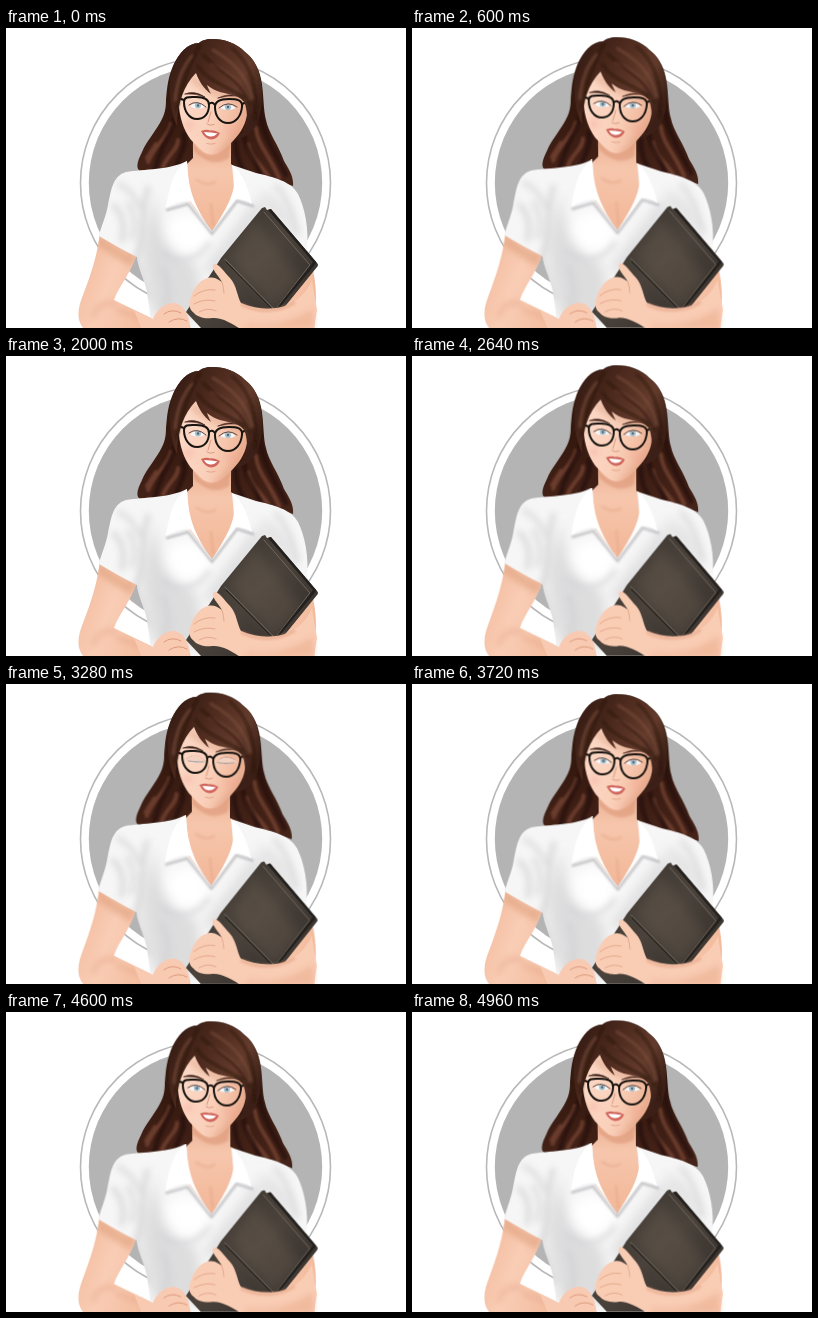
An HTML page for the animation above (5 s loop, 400 by 300 pixels).

```html
<!DOCTYPE html>
<html lang="en">
<head>
<meta charset="utf-8">
<title>Woman with folder</title>
<style>
  html, body { margin: 0; width: 100%; height: 100%; overflow: hidden; background: #fff; }
  svg { display: block; width: 400px; height: 300px; }
  .body, .head, .lids { animation: 5s ease-in-out infinite; }
  .body { transform-origin: 200px 300px; animation-name: breathe; }
  .head { transform-origin: 206px 125px; animation-name: nod; }
  .lids { transform-origin: 206px 71px; transform: scaleY(0); animation-name: blink; }
  @keyframes breathe {
    0%, 41%, 82% { transform: none; }
    20.5%, 61.5%, 100% { transform: skewX(.4deg) scaleY(1.014); }
  }
  @keyframes nod {
    0%, 41%, 82% { transform: none; }
    20.5%, 61.5%, 100% { transform: translate(-1.6px, -2.4px) rotate(-.4deg); }
  }
  @keyframes blink {
    0%, 63.2% { transform: scaleY(0); }
    65%, 66.2% { transform: none; }
    68%, 100% { transform: scaleY(0); }
  }
</style>
</head>
<body>
<svg viewBox="0 0 400 300" fill="none" stroke-linecap="round" stroke-linejoin="round">
  <defs>
    <filter id="soft1" x="-50%" y="-50%" width="200%" height="200%"><feGaussianBlur stdDeviation="1.2"/></filter>
    <filter id="soft2" x="-50%" y="-50%" width="200%" height="200%"><feGaussianBlur stdDeviation="3"/></filter>
    <filter id="soft3" x="-50%" y="-50%" width="200%" height="200%"><feGaussianBlur stdDeviation="6"/></filter>
    <linearGradient id="hairTone" x1="0" y1="0" x2="0" y2="1">
      <stop offset="0" stop-color="#32190f"/><stop offset=".5" stop-color="#35190f"/><stop offset="1" stop-color="#47241a"/>
    </linearGradient>
    <linearGradient id="bangTone" x1="0" y1="0" x2="1" y2=".6">
      <stop offset="0" stop-color="#2f1811"/><stop offset=".4" stop-color="#4a281c"/><stop offset=".75" stop-color="#633b2c"/><stop offset="1" stop-color="#3c2017"/>
    </linearGradient>
    <linearGradient id="faceTone" x1="0" y1="0" x2="1" y2=".3">
      <stop offset="0" stop-color="#fcdac8"/><stop offset=".6" stop-color="#fad0ba"/><stop offset="1" stop-color="#efb699"/>
    </linearGradient>
    <linearGradient id="neckTone" x1="0" y1="0" x2="0" y2="1">
      <stop offset="0" stop-color="#eaae90"/><stop offset=".35" stop-color="#f6c6ac"/><stop offset="1" stop-color="#f2b697"/>
    </linearGradient>
    <linearGradient id="armTone" x1="0" y1="0" x2="1" y2=".4">
      <stop offset="0" stop-color="#f0b596"/><stop offset=".45" stop-color="#f9cdb5"/><stop offset="1" stop-color="#f2b99b"/>
    </linearGradient>
    <linearGradient id="coverTone" x1="0" y1="0" x2="1" y2="1">
      <stop offset="0" stop-color="#39342f"/><stop offset=".5" stop-color="#4a423b"/><stop offset="1" stop-color="#2d2825"/>
    </linearGradient>
    <path id="hairShape" d="M206 11C200 11 195 13 193 15C181 15 173 26 168 36C162 48 161 60 160 72C160 82 158 87 156 91C151 102 141 112 136 124C132 132 129 140 134 143C143 149 157 145 188 137V110H225V138C242 148 264 150 287 158C288 148 282 140 278 133C273 118 262 104 260 92C257 82 258 65 255 51C253 40 247 30 239 24C230 15 219 11 206 11Z"/>
    <path id="blouseShape" d="M181 133C164 142 138 141 120 144C106 148 105 164 102 177C100 189 95 198 93 208C105 215 119 223 131 229C132 240 138 250 141 264L146 300H296L301 221C303 201 299 180 292 166C285 153 267 149 250 145L226 137L229 172L206 203L184 174Z"/>
    <path id="faceShape" d="M190 42C180 54 172 66 173 80C175 95 180 107 187 114C193 120 198 126 205 126.500C213 126 219 120 225 115C232 108 239 99 241 87Q243 78 239 70Z"/>
    <path id="coverShape" d="M256 180L259 179L261 182L265 181L311 235Q313 237 311 239L268 292L258 300H195L180 284L208 241L215 230Z"/>
    <path id="armShape" d="M94 203C92 226 85 246 77 267C71 282 70 294 80 303H170L147 291L108 272C113 258 124 247 131 226Z"/>
    <path id="farArm" d="M301 222C306 235 310 250 310 270L308 302H248L262 279L292 245Z"/>
    <clipPath id="inHair"><use href="#hairShape"/></clipPath>
    <clipPath id="inBlouse"><use href="#blouseShape"/></clipPath>
    <clipPath id="inFace"><use href="#faceShape"/></clipPath>
    <clipPath id="inCover"><use href="#coverShape"/></clipPath>
    <clipPath id="inArm"><use href="#armShape"/></clipPath>
  </defs>

  <circle cx="199.500" cy="155" r="125" stroke="#b8b8b8" stroke-width="1.600"/>
  <circle cx="199.500" cy="155" r="116.700" fill="#b4b4b4"/>

  <g class="head">
    <use href="#hairShape" fill="url(#hairTone)"/>
    <g clip-path="url(#inHair)">
      <g stroke="#7d4a37" stroke-width="4" opacity=".7" filter="url(#soft1)">
        <path d="M165 96C162 110 149 116 142 134M172 112C172 122 162 126 157 139M150 116L141 130"/>
        <path d="M250 100C251 116 264 128 273 150M242 116C244 130 255 136 262 148"/>
      </g>
      <g stroke="#220f09" stroke-width="4" opacity=".7" filter="url(#soft1)">
        <path d="M172 75C170 102 156 112 149 142M178 106C181 121 172 128 170 141"/>
        <path d="M253 69C252 100 266 119 280 147M238 106C239 124 250 130 254 147M230 114C229 125 233 135 239 145"/>
      </g>
    </g>
  </g>

  <g class="body">
    <path d="M187 108L187 130L178 139L182 178L206 206L232 172L230 140L225 136V109Z" fill="url(#neckTone)"/>
    <path d="M187 114C196 130 212 133 225 112L223 130C208 139 198 132 188 123Z" fill="#d9906f" opacity=".5" filter="url(#soft1)"/>
    <path d="M191 152Q202 159 209 154M205 176L207 197" stroke="#dfa081" stroke-width="2" opacity=".5" filter="url(#soft1)"/>

    <use href="#armShape" fill="url(#armTone)"/>
    <g clip-path="url(#inArm)" filter="url(#soft2)">
      <path d="M92 206Q112 222 132 227L125 239Q107 229 91 217Z" fill="#d99573" opacity=".5"/>
      <path d="M109 276C96 272 90 281 87 289M112 282L149 295" stroke="#e29e7f" stroke-width="4" opacity=".5"/>
    </g>

    <use href="#blouseShape" fill="#f6f6f6"/>
    <g clip-path="url(#inBlouse)">
      <g filter="url(#soft3)">
        <path d="M150 165Q138 200 136 228L148 290H200L190 236Q152 226 150 165Z" fill="#cfcfd1" opacity=".65"/>
        <ellipse cx="182" cy="205" rx="22" ry="20" fill="#fff"/>
        <path d="M252 162Q282 172 290 212L262 178Z" fill="#d2d2d4" opacity=".7"/>
        <path d="M252 180L206 240" stroke="#c4c4c7" stroke-width="12" opacity=".5"/>
      </g>
      <g filter="url(#soft2)" stroke-width="5" opacity=".6">
        <path d="M142 160C134 181 140 207 130 231L142 270M108 178Q121 190 116 212" stroke="#c6c6c9"/>
        <path d="M157 224C173 239 192 231 203 216M113 156Q128 164 134 180M122 176Q132 190 126 210" stroke="#cfcfd2"/>
        <path d="M270 158Q284 171 291 205M157 240Q165 260 160 280" stroke="#cdcdd0"/>
      </g>
    </g>
    <path d="M161 182L182 176L206 206L231 173L247 178" stroke="#9f9fa4" stroke-width="2.500" opacity=".6" filter="url(#soft1)"/>
    <path d="M181 133C170 141 164 153 160 180Q174 171 184 173L206 203C190 181 182 164 181 133ZM226 137C231 154 230 168 206 203L230 171Q239 171 246 176C242 160 237 145 226 137Z" fill="#fff"/>

    <use href="#farArm" fill="url(#armTone)"/>
    <path d="M147 291C150 283 157 275 168 275C177 276 183 285 185 302H136L128 282Z" fill="#f8cab1"/>
    <path d="M158 286Q166 280 175 285M163 294Q172 288 181 293" stroke="#d99577" stroke-width=".9"/>

    <use href="#coverShape" fill="url(#coverTone)"/>
    <g clip-path="url(#inCover)">
      <path d="M249 192L295 251L269 283L223 229Z" fill="#6f6357" opacity=".35" filter="url(#soft3)"/>
      <path d="M264 182L309 234L268 284" stroke="#24201d" stroke-width="3"/>
      <path d="M258 184L304 237L271 279M219 231L268 281" stroke="#81786c" stroke-width=".7"/>
      <path d="M220 234L268 283" stroke="#1f1c19"/>
    </g>

    <path d="M208 236C213 235 218 244 224 250C231 258 231 268 235 275C249 281 262 282 276 279C292 275 302 262 306 252L311 282L308 302H236C226 295 215 289 206 290C199 291 191 289 188 285C182 281 183 274 185 269C187 262 193 252 202 250C209 248 214 253 216 254C212 247 204 240 208 236Z" fill="#f9ccb4"/>
    <path d="M242 296C262 300 287 294 307 280L308 301H238Z" fill="#e7a886" opacity=".5" filter="url(#soft2)"/>
    <path d="M236 277C251 284 272 285 288 275" stroke="#e3a182" stroke-width="3" opacity=".6" filter="url(#soft1)"/>
    <path d="M188 268Q198 260 209 262M188 276Q199 270 209 273M193 284Q202 279 210 283M216 254Q218 260 218 265" stroke="#dfa183" stroke-width=".8"/>
  </g>

  <g class="head">
    <use href="#faceShape" fill="url(#faceTone)"/>
    <g clip-path="url(#inFace)" filter="url(#soft2)">
      <path d="M242 78C240 98 226 116 211 128" stroke="#db977b" stroke-width="6" opacity=".5"/>
      <path d="M186 50Q204 66 238 72" stroke="#cd8c6d" stroke-width="5" opacity=".5"/>
      <circle cx="183" cy="97" r="5" fill="#f4aa98" opacity=".45"/>
      <circle cx="226" cy="101" r="6" fill="#f4a894" opacity=".45"/>
    </g>

    <path d="M179 66Q188 62 199 69Q189 65 179 66ZM212 70Q222 65 233 68Q222 67 212 70Z" fill="#3d2018" stroke="#3d2018" stroke-width=".6"/>
    <path d="M184 78Q191 72 199 79Q191 83 184 78ZM214 80Q222 73 230 80Q222 84 214 80Z" fill="#f4f8fa"/>
    <g fill="#a9c0ce"><circle cx="192" cy="77.500" r="3"/><circle cx="222" cy="79" r="3.100"/></g>
    <g fill="#56646e"><circle cx="192" cy="77.500" r="1.200"/><circle cx="222" cy="79" r="1.200"/></g>
    <path d="M183 77Q191 71 200 79M213 80Q222 72 231 79" stroke="#4a3630" stroke-width=".9"/>
    <g class="lids">
      <path d="M181 78Q191 69 201 79L199 80Q191 80 183 79ZM212 80Q222 71 233 80L230 82Q222 82 214 81Z" fill="#f5d2c0"/>
      <path d="M184 79Q191 80.500 199 80M214 81Q222 82.500 230 81" stroke="#8d8c8e" stroke-width=".8"/>
    </g>

    <path d="M205 84L202 94M201 96Q204 98.500 208 96.500" stroke="#d69478" stroke-width=".9"/>
    <path d="M195 103Q201 101 204 102.500Q208 101.500 214 105Q211 111.500 205 111.500Q199 111 195 103Z" fill="#d0665c"/>
    <path d="M198 104Q205 104 211.500 105.500Q208 109 204 108.500Q200 108 198 104Z" fill="#fff"/>
    <path d="M201 115.500Q205 117 209 115.500" stroke="#e2a78c"/>

    <g stroke="#17130f" stroke-width="2">
      <path d="M178 74C178 68 184 69 190 69C198 69 203 71 203 77C203 86 198 91 191 91C183 91 178 83 178 74ZM209 79C209 73 215 71 223 71C231 71 237 72 236 79C235 88 230 95 222 95C214 95 209 88 209 79Z"/>
      <path d="M203 76Q206 73 209 77M236 76L241 74M178 72L175 71"/>
    </g>

    <path d="M206 11C200 11 195 13 193 15C181 15 173 26 168 36C161 52 163 82 171 98C171 76 178 57 190 45C193 53 197 60 205 66Q202 60 201 57C209 64 219 65 226 67C235 69 239 73 240 80C243 93 238 104 232 110C246 109 258 92 256 61C254 40 247 30 239 24C230 15 219 11 206 11Z" fill="url(#bangTone)"/>
    <g filter="url(#soft1)">
      <path d="M186 28C177 38 171 52 169 72M207 22C224 32 240 44 246 70M206 36C222 44 236 54 243 72" stroke="#7c4f3d" stroke-width="3" opacity=".6"/>
      <path d="M194 17C185 32 176 51 171 82M197 27C213 44 235 50 244 76M192 38C202 54 222 58 238 70M226 20C246 37 252 61 249 92" stroke="#27110b" stroke-width="2.200" opacity=".65"/>
    </g>
  </g>
</svg>
</body>
</html>
```
